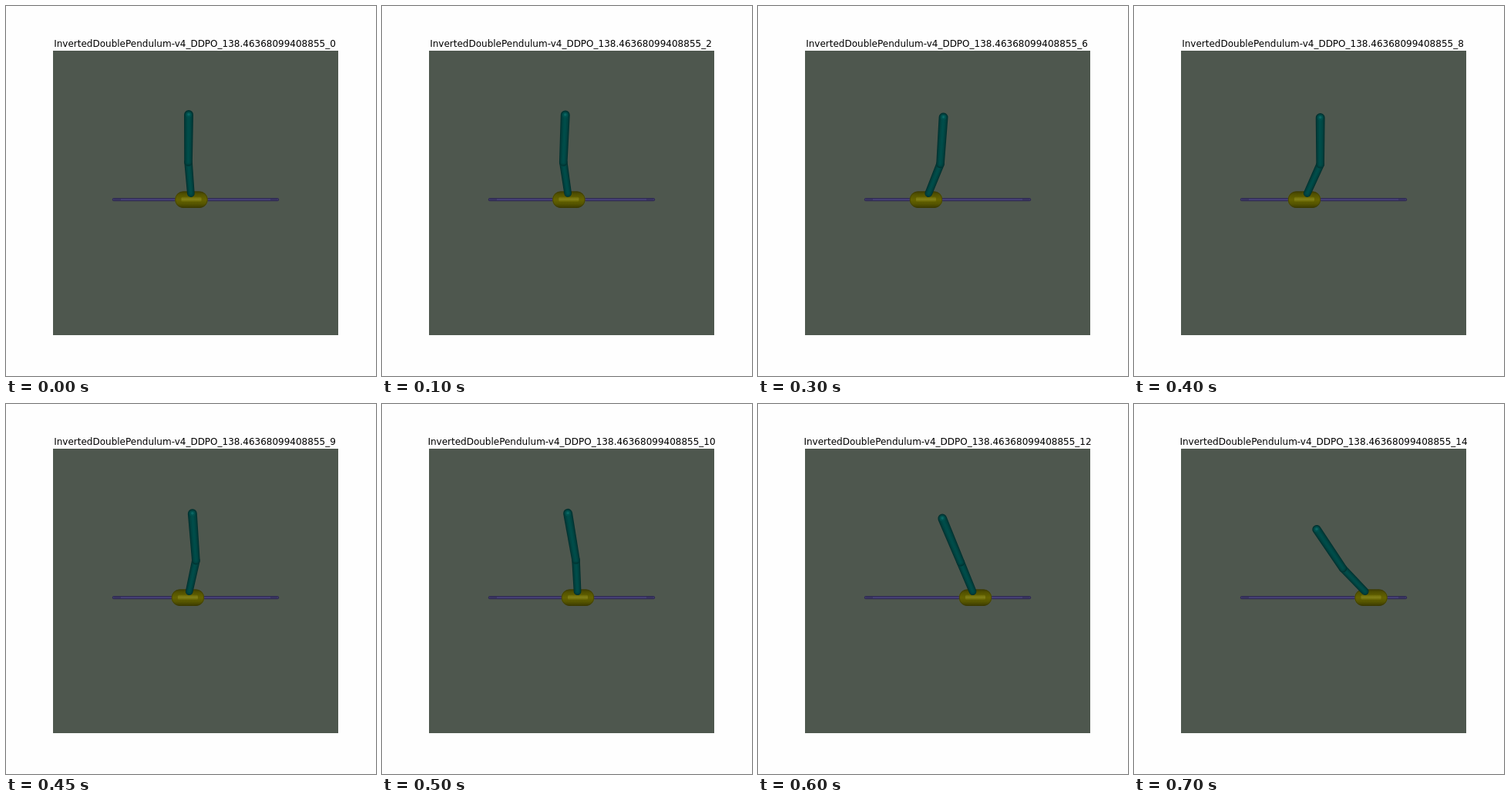
Animation, 480 px wide and 480 px high, one loop 0.75 s. Source, as an HTML page:

```html
<!DOCTYPE html>
<html lang="en">
<head>
<meta charset="utf-8">
<title>Inverted double pendulum</title>
<style>
html, body { margin: 0; width: 100%; height: 100%; overflow: hidden; background: #fefefe; }
svg { display: block; width: 100vw; height: 100vh; }
text { font: 12px "DejaVu Sans", Verdana, sans-serif; text-anchor: middle; fill: #000; }
</style>
</head>
<body>
<svg viewBox="0 0 480 480">
  <defs>
    <linearGradient id="body" x1="0" y1="0" x2="0" y2="1">
      <stop offset="0" stop-color="#3f3e00"/>
      <stop offset=".2" stop-color="#545300"/>
      <stop offset=".5" stop-color="#656300"/>
      <stop offset=".75" stop-color="#565500"/>
      <stop offset="1" stop-color="#3a3900"/>
    </linearGradient>
    <linearGradient id="shine" x1="0" y1="0" x2="0" y2="1">
      <stop offset="0" stop-color="#6a6804"/>
      <stop offset=".5" stop-color="#817f18"/>
      <stop offset="1" stop-color="#6a6804"/>
    </linearGradient>
  </defs>
  <rect x="61" y="58" width="370" height="369" fill="#4e574e"/>
  <text id="title" y="53"></text>
  <rect x="137.8" y="249" width="216.4" height="4.3" rx="2.1" fill="#302c52"/>
  <rect x="139" y="250.2" width="214" height="1.7" rx=".8" fill="#48427a"/>
  <path d="M140 251H149M343 251H352" stroke="#2c294c" stroke-width="1"/>
  <g id="cart">
    <rect x="-21.2" y="240.4" width="42.4" height="21.6" rx="10.8" fill="url(#body)"/>
    <rect x="-20.7" y="240.9" width="41.4" height="20.6" rx="10.3" fill="none" stroke="#3b3a00" stroke-opacity=".6"/>
    <rect x="-13" y="247.8" width="26" height="6" rx="1.5" fill="url(#shine)"/>
  </g>
  <g id="poles"></g>
</svg>
<script>
const STEP = 50, COUNT = 15, LEN = 0.6, RADIUS = 0.045;
const SHADES = [[1, '#003230'], [0.82, '#003d3b'], [0.58, '#004643'], [0.3, '#004c49']];
// step, cart position, lower and upper pole angles
const KEYS = [
  [0, -0.052, -0.047, 0.021],
  [4, -0.080, -0.029, 0.077],
  [6, -0.264, 0.310, 0.066],
  [8, -0.236, 0.338, 0.007],
  [10, 0.0754, -0.048, -0.140],
  [12, 0.339, -0.332, -0.332],
  [14, 0.580, -0.650, -0.500]
];
const $ = id => document.getElementById(id);

// camera tilted 45 degrees down
function project(x, z) {
  const v = (z - 0.1225) * Math.SQRT1_2;
  const s = 446.6 / (4.1225 - v);
  return { x: 246 + x * s, y: 242.2 - v * s, r: RADIUS * s };
}

function slope(i, c) {
  if (i === 0) return 0;
  const a = KEYS[i - 1], b = KEYS[i], d = KEYS[i + 1];
  const h = b[0] - a[0], left = (b[c] - a[c]) / h;
  if (!d) return left;
  const k = d[0] - b[0], right = (d[c] - b[c]) / k;
  return (left * k + right * h) / (h + k);
}

function value(n, c) {
  let i = 0;
  while (i < KEYS.length - 2 && n >= KEYS[i + 1][0]) i++;
  const a = KEYS[i], b = KEYS[i + 1], h = b[0] - a[0], u = (n - a[0]) / h, w = 1 - u;
  return w * w * (1 + 2 * u) * a[c] + u * u * (3 - 2 * u) * b[c]
    + h * u * w * (w * slope(i, c) - u * slope(i + 1, c));
}

function capsule(p, q, k, fill) {
  const d = Math.hypot(q.x - p.x, q.y - p.y);
  const nx = (p.y - q.y) / d, ny = (q.x - p.x) / d, a = p.r * k, b = q.r * k;
  const at = (o, r) => `${(o.x + nx * r).toFixed(2)} ${(o.y + ny * r).toFixed(2)}`;
  return `<path fill="${fill}" d="M${at(p, a)}L${at(q, b)}A${b} ${b} 0 0 0 ${at(q, -b)}`
    + `L${at(p, -a)}A${a} ${a} 0 0 0 ${at(p, a)}Z"/>`;
}

const pole = (p, q) => SHADES.map(([k, fill]) => capsule(p, q, k, fill)).join('');
const dot = (p, r, fill) => `<circle cx="${p.x}" cy="${p.y}" r="${r}" fill="${fill}"/>`;

function draw(n) {
  const [x, a, b] = [1, 2, 3].map(c => value(n, c));
  const mx = x + LEN * Math.sin(a), mz = LEN * Math.cos(a);
  const base = project(x + 0.11 * Math.tan(a), 0.11);
  const mid = project(mx, mz);
  const tip = project(mx + LEN * Math.sin(b), mz + LEN * Math.cos(b));
  $('cart').setAttribute('transform', `translate(${project(x, 0).x.toFixed(2)} 0)`);
  $('poles').innerHTML = pole(base, mid) + pole(mid, tip)
    + dot(tip, 3.6, '#00504d') + dot({ x: tip.x, y: tip.y - 0.3 }, 1.8, '#0b6663');
  $('title').setAttribute('x', n < 10 ? 245 : 246);
  $('title').textContent = 'InvertedDoublePendulum-v4_DDPO_138.46368099408855_' + n;
}

const start = performance.now();
let shown = -1;
function tick() {
  const n = Math.floor((performance.now() - start) / STEP) % COUNT;
  if (n !== shown) draw(shown = n);
  requestAnimationFrame(tick);
}
tick();
</script>
</body>
</html>
```
